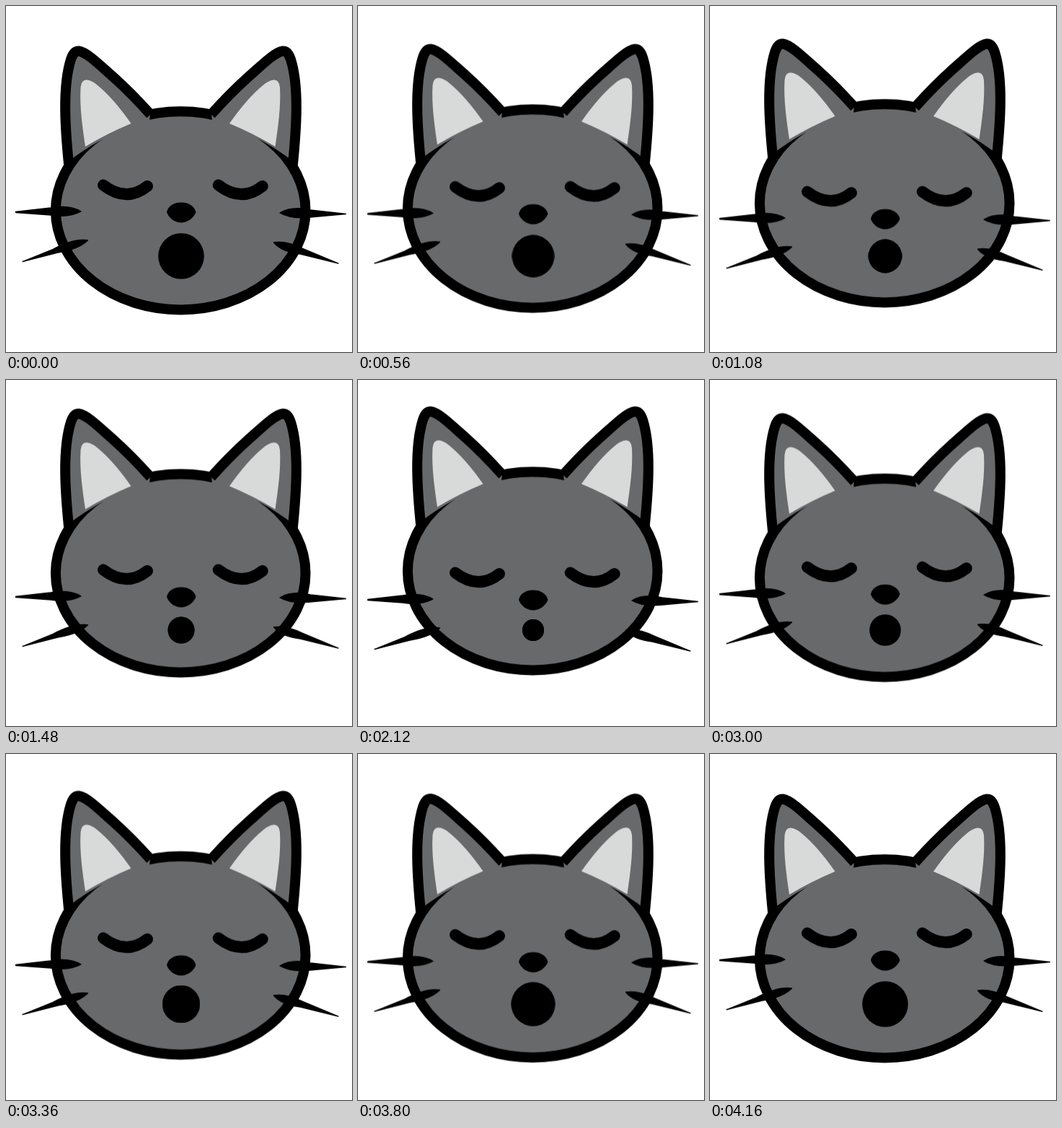
Recreate the animation shown at these times as an HTML page. Size 480 px wide and 480 px high, loop 4.2 s.

```html
<!DOCTYPE html>
<html lang="en">
<head>
<meta charset="utf-8">
<title>Yawning cat</title>
<style>
  html, body { margin: 0; width: 100%; height: 100%; overflow: hidden; background: #fff; }
  svg { display: block; width: 100vw; height: 100vh; }
  .line { fill: none; stroke: #000; stroke-width: 14; }
  .eye { fill: none; stroke: #000; stroke-width: 16; stroke-linecap: round; }
  .whiskers { stroke: #000; stroke-width: 1.3; stroke-linejoin: round; }
  .fur { fill: #68696b; }
  .inner { fill: #d7dad9; }
  #mouth { transform-origin: 243px 347px; }
</style>
</head>
<body>
<svg viewBox="0 0 480 480">
  <defs>
    <g id="ear">
      <path class="fur" d="M86 216C82 170 78 112 90 74Q94 62 101 62.500C112 64 129 81 149.500 99Q174 121 200 150L199 159Q165 170 132 186Q108 199 86 216Z"/>
      <path class="line" d="M87.500 224C82 170 78 112 90 74Q94 62 101 62.500C112 64 129 81 149.500 99Q174 121 200.500 150.500"/>
    </g>
    <path id="inner" class="inner" d="M110 195C106 167 102 140 103.500 113Q104.500 102 112 102.500Q120 103.500 127 110Q149 128 173.500 163Q140 177 110 195Z"/>
    <path id="eye" class="eye" d="M135 248.500Q167 273 196 250"/>
  </defs>
  <g id="head">
    <ellipse class="fur" cx="242.200" cy="283.800" rx="173.300" ry="137.600" stroke="#000" stroke-width="14"/>
    <use href="#ear"/>
    <use href="#ear" transform="translate(485 0) scale(-1 1)"/>
    <use href="#inner"/>
    <use href="#inner" transform="translate(483.500 0) scale(-1 1)"/>
  </g>
  <g id="face">
    <use href="#eye"/>
    <use href="#eye" x="159.700"/>
    <path d="M223 286C225 277 233 272.500 243 272.500S261 277 263.500 286C260 295 251 300.500 243 300.500S226 295 223 286Z"/>
    <g class="whiskers">
      <path d="M13.500 285.500L62 280Q88 275 104 285Q88 294 62 290L13.500 286.500Z"/>
      <path d="M23 354.500L65 337.500Q95 322 113.500 325Q100 338 72 342Z"/>
      <path d="M471.500 288.500L422 283Q397 277 380 287Q395 296 422 293Z"/>
      <path d="M461 357L412 336.500Q388 325 371.500 328Q382 341 408 344Z"/>
    </g>
  </g>
  <circle id="mouth" cx="243" cy="347" r="31.800"/>
</svg>
<script>
  const LOOP = 4200;
  const SINE = 'cubic-bezier(.364, 0, .636, 1)';
  const SOFT = 'cubic-bezier(.4, .2, .6, .8)';

  // Leaves rest at start, reaches the far pose at peak, is back at end.
  function sway(id, rest, far, [start, peak, end], back = SINE) {
    const key = (time, transform, easing = 'linear') => ({ offset: time / LOOP, transform, easing });
    document.getElementById(id).animate([
      key(0, rest),
      key(start, rest, SINE),
      key(peak, far, back),
      key(end, rest),
      key(LOOP, rest)
    ], { duration: LOOP, iterations: Infinity });
  }

  sway('head', 'translateY(0)', 'translateY(-19px)', [80, 2000, 4000]);
  sway('face', 'translateY(0)', 'translateY(19px)', [100, 2100, 4180], SOFT);
  sway('mouth', 'scale(1)', 'scale(.48)', [40, 2100, 4180]);
</script>
</body>
</html>
```
